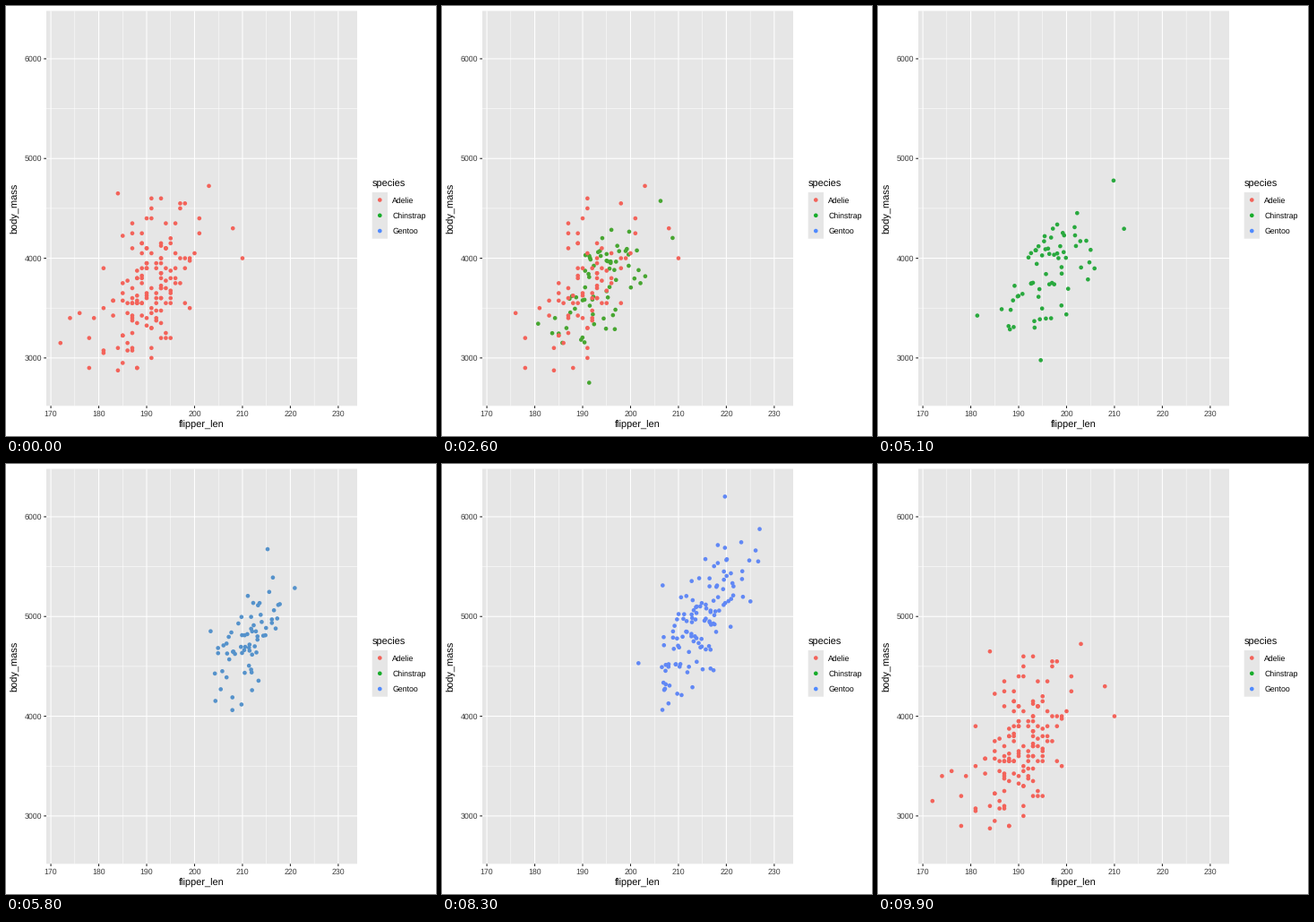
A matplotlib script for the animation above (10000 ms loop, 480 by 480 pixels).

```python
import numpy as np
import matplotlib.pyplot as plt
from matplotlib.animation import FuncAnimation
from matplotlib.colors import to_rgb
from matplotlib.patches import Rectangle

plt.rcParams["font.family"] = "Liberation Sans"
plt.rcParams["text.hinting"] = "none"

SIZE, DPI = 480, 80
PT = 72 / DPI  # points per pixel
LEFT, RIGHT, TOP, BOTTOM = 45.0, 392.0, 5.5, 446.3
PANEL, INK, TICK = "#E6E6E6", "#3C3C3C", "#262626"
SPECIES = ("Adelie", "Chinstrap", "Gentoo")
HUES = ("#F8766D", "#00BA38", "#619CFF")
DOT = 4.62

HOLD_END = (11, 45, 78)
ARRIVE = (33, 66, 99)
FIRST, SECOND, REST = 68, 55, 28  # birds with two, one and no partners

rng = np.random.default_rng(12)


def cloud(n, length, mass, sd, slope, spread, low):
    """Correlated normal birds, cut at the rim, on the measuring grid."""
    z = rng.normal(size=(3 * n, 2))
    z = z[np.hypot(z[:, 0], z[:, 1]) < 2.2][:n]
    x = np.maximum(np.round(length + sd * z[:, 0]), low)
    y = mass + slope * (x - length) + spread * z[:, 1]
    y = np.round(y / 50) * 50 + 25 * (rng.random(n) < 0.2)
    return np.column_stack([x, y])


def group(n, shape, *extremes):
    """A cloud of n birds led by its few extreme ones."""
    return np.vstack([*extremes, cloud(n - len(extremes), *shape)])


ADELIE = (190, 3690, 5.6, 33, 385, 176)
CHINSTRAP = (196, 3740, 6.3, 33, 265, 181)
GENTOO = (216.3, 5000, 5.7, 58, 310, 208)

adelie = np.vstack([
    group(FIRST, ADELIE, (172, 3150), (174, 3400), (184, 4650), (197, 4500)),
    group(SECOND, ADELIE, (178, 2900), (203, 4725), (208, 4300), (191, 4600)),
    group(REST, ADELIE, (210, 4000), (176, 3450)),
])
gentoo = np.vstack([
    group(FIRST, GENTOO, (210, 4600), (218, 5700), (208, 5350), (221, 6300)),
    group(SECOND, GENTOO, (203, 4625), (228, 5600), (226, 5200), (229, 5950)),
])
chinstrap = group(FIRST, CHINSTRAP, (192, 2700), (178, 3250),
                  (210, 4800), (212, 4300))[::-1]


def px(length):
    return LEFT + (length - 169.05) / 64.9 * (RIGHT - LEFT)


def py(mass):
    return BOTTOM - (mass - 2520) / 3960 * (BOTTOM - TOP)


DATA = [np.column_stack([px(d[:, 0]), py(d[:, 1])])
        for d in (adelie, chinstrap, gentoo)]

# Colours blend in Lab, which is linear in the cube root of XYZ
XYZ = np.array([[0.4124, 0.3576, 0.1805],
                [0.2126, 0.7152, 0.0722],
                [0.0193, 0.1192, 0.9505]])
WHITE = XYZ.sum(axis=1)


def to_root(hue):
    linear = ((np.array(to_rgb(hue)) + 0.055) / 1.055) ** 2.4
    return np.cbrt(XYZ @ linear / WHITE)


def from_root(root):
    """Back to RGB, on a display with gamma 1.8."""
    r, g, b = np.clip(np.linalg.solve(XYZ, root ** 3 * WHITE), 0, 1)
    return np.array([0.972 * r + 0.025 * g, g, b]) ** (1 / 1.8)


ROOTS = [to_root(h) for h in HUES]

fig = plt.figure(figsize=(SIZE / DPI, SIZE / DPI), dpi=DPI, facecolor="white")
ax = fig.add_axes([0, 0, 1, 1])
ax.set_xlim(0, SIZE)
ax.set_ylim(SIZE, 0)
ax.axis("off")


def box(x0, y0, x1, y1):
    ax.add_patch(Rectangle((x0, y0), x1 - x0, y1 - y0, fc=PANEL, lw=0,
                           zorder=0, snap=False))


def line(x0, y0, x1, y1, width, color="white"):
    ax.plot([x0, x1], [y0, y1], color=color, lw=width * PT, zorder=1,
            solid_capstyle="butt", snap=False)


def label(x, y, text, size=8.8, color=INK, ha="center", angle=0):
    ax.text(x, y, text, fontsize=size * PT, color=color, ha=ha,
            va="baseline", rotation=angle, rotation_mode="anchor")


def dots(points, colors, z):
    return ax.scatter(points[:, 0], points[:, 1], s=(DOT * PT) ** 2,
                      c=colors, linewidths=0, zorder=z)


box(LEFT, TOP, RIGHT, BOTTOM)
for v in range(175, 230, 10):
    line(px(v), TOP, px(v), BOTTOM, 0.53)
for v in range(3500, 6000, 1000):
    line(LEFT, py(v), RIGHT, py(v), 0.53)
for v in range(170, 231, 10):
    line(px(v), TOP, px(v), BOTTOM, 1.07)
    line(px(v), BOTTOM, px(v), BOTTOM + 2.75, 1.07, TICK)
    label(px(v), 458, str(v))
for v in range(3000, 6001, 1000):
    line(LEFT, py(v), RIGHT, py(v), 1.07)
    line(LEFT - 2.75, py(v), LEFT, py(v), 1.07, TICK)
    label(40, py(v) + 3.15, str(v), ha="right")
label((LEFT + RIGHT) / 2, 471, "flipper_len", 11, "black")
label(13.3, (TOP + BOTTOM) / 2, "body_mass", 11, "black", angle=90)

label(408.3, 202, "species", 11, "black", "left")
box(408.7, 207.9, 426, 259.7)
keys = np.array([(417.3, 216.5 + 17.28 * i) for i in range(3)])
dots(keys, [from_root(r) for r in ROOTS], 2)
for (_, y), name in zip(keys, SPECIES):
    label(431.3, y + 3.2, name, color="black", ha="left")

birds = dots(DATA[0], np.tile(from_root(ROOTS[0]), (len(DATA[0]), 1)), 3)


def ease(t):
    return 4 * t ** 3 if t < 0.5 else 1 - 4 * (1 - t) ** 3


def phase(frame):
    for k, (start, end) in enumerate(zip(HOLD_END, ARRIVE)):
        if frame <= start:
            return k, 0
        if frame < end:
            return k, ease((frame - start) / (end - start))
    return 0, 0


def update(frame):
    k, e = phase(frame)
    nxt = (k + 1) % 3
    a, b = DATA[k], DATA[nxt]
    n = min(len(a), len(b))
    # Birds without a partner stay put until the next group has arrived
    moving = a[:n] + (b[:n] - a[:n]) * e
    colors = np.tile(from_root(ROOTS[k]), (len(a), 1))
    colors[:n] = from_root(ROOTS[k] + (ROOTS[nxt] - ROOTS[k]) * e)
    birds.set_offsets(np.vstack([moving, a[n:]]))
    birds.set_facecolor(colors)
    return (birds,)


anim = FuncAnimation(fig, update, frames=100, interval=100, repeat=True,
                     repeat_delay=0, blit=False)
plt.show()
```
